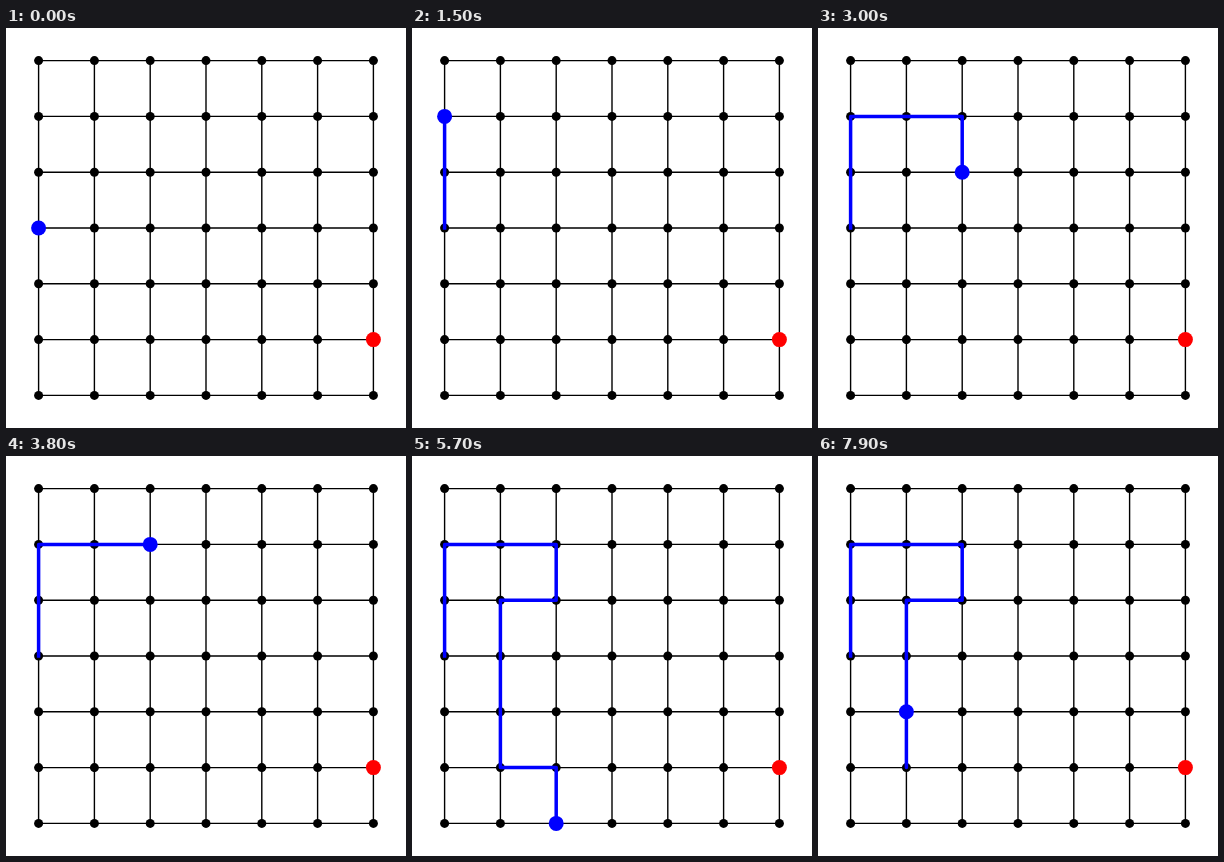
An HTML page for the animation above (8000 ms loop, 400x400 px).

```html
<!DOCTYPE html>
<html lang="en">
<head>
<meta charset="utf-8">
<title>Loop-erased random walk</title>
<style>
  html, body { margin: 0; width: 100%; height: 100%; overflow: hidden; background: #fff; }
  svg { display: block; width: 100vw; height: 100vh; }
</style>
</head>
<body>
<svg viewBox="0 0 400 400">
  <path id="grid" stroke="#000" stroke-width="1.4" stroke-linecap="square" fill="none"/>
  <g id="nodes"></g>
  <path id="trail" stroke="#00f" stroke-width="3.5" stroke-linecap="square" stroke-linejoin="round" fill="none"/>
  <circle id="goal" r="7.5" fill="#f00"/>
  <circle id="walker" r="7.5" fill="#00f"/>
</svg>
<script>
const SIZE = 7, STEP_MS = 100, LOOP_MS = 8000;
const START = [0, 3], GOAL = [6, 5];
const MOVES = 'UDDDRUUL UUUDRR UDLRUDLR DDUUDU DLRULRUD DLDDDRD ULDUDLRRL RULDUU'.replace(/ /g, '');
const DELTA = { U: [0, -1], D: [0, 1], L: [-1, 0], R: [1, 0] };

const $ = id => document.getElementById(id);
const pos = i => +(32.6 + 55.8 * i).toFixed(2);

function place(circle, [col, row]) {
  circle.setAttribute('cx', pos(col));
  circle.setAttribute('cy', pos(row));
}

function drawGrid() {
  let d = '';
  for (let i = 0; i < SIZE; i++) {
    const p = pos(i), a = pos(0), b = pos(SIZE - 1);
    d += `M${a} ${p}H${b}M${p} ${a}V${b}`;
    for (let j = 0; j < SIZE; j++) {
      const dot = document.createElementNS('http://www.w3.org/2000/svg', 'circle');
      dot.setAttribute('r', 4.5);
      place(dot, [i, j]);
      $('nodes').append(dot);
    }
  }
  $('grid').setAttribute('d', d);
  place($('goal'), GOAL);
}

// A closed loop is shown for one step, then cut off in the next.
function walk() {
  let path = [START];
  const states = [path];
  for (const move of MOVES) {
    const [x, y] = path[path.length - 1], [dx, dy] = DELTA[move];
    const next = [x + dx, y + dy];
    const seen = path.findIndex(p => p[0] === next[0] && p[1] === next[1]);
    path = [...path, next];
    states.push(path);
    if (seen >= 0) {
      path = path.slice(0, seen + 1);
      states.push(path);
    }
  }
  return states;
}

const states = walk();
const origin = performance.now();

function render(now) {
  const t = Math.max(0, now - origin) % LOOP_MS;
  const path = states[Math.floor(t / STEP_MS)];
  $('trail').setAttribute('d', path.length > 1
    ? 'M' + path.map(p => p.map(pos).join(' ')).join('L') : '');
  place($('walker'), path[path.length - 1]);
  requestAnimationFrame(render);
}

drawGrid();
render(origin);
</script>
</body>
</html>
```
